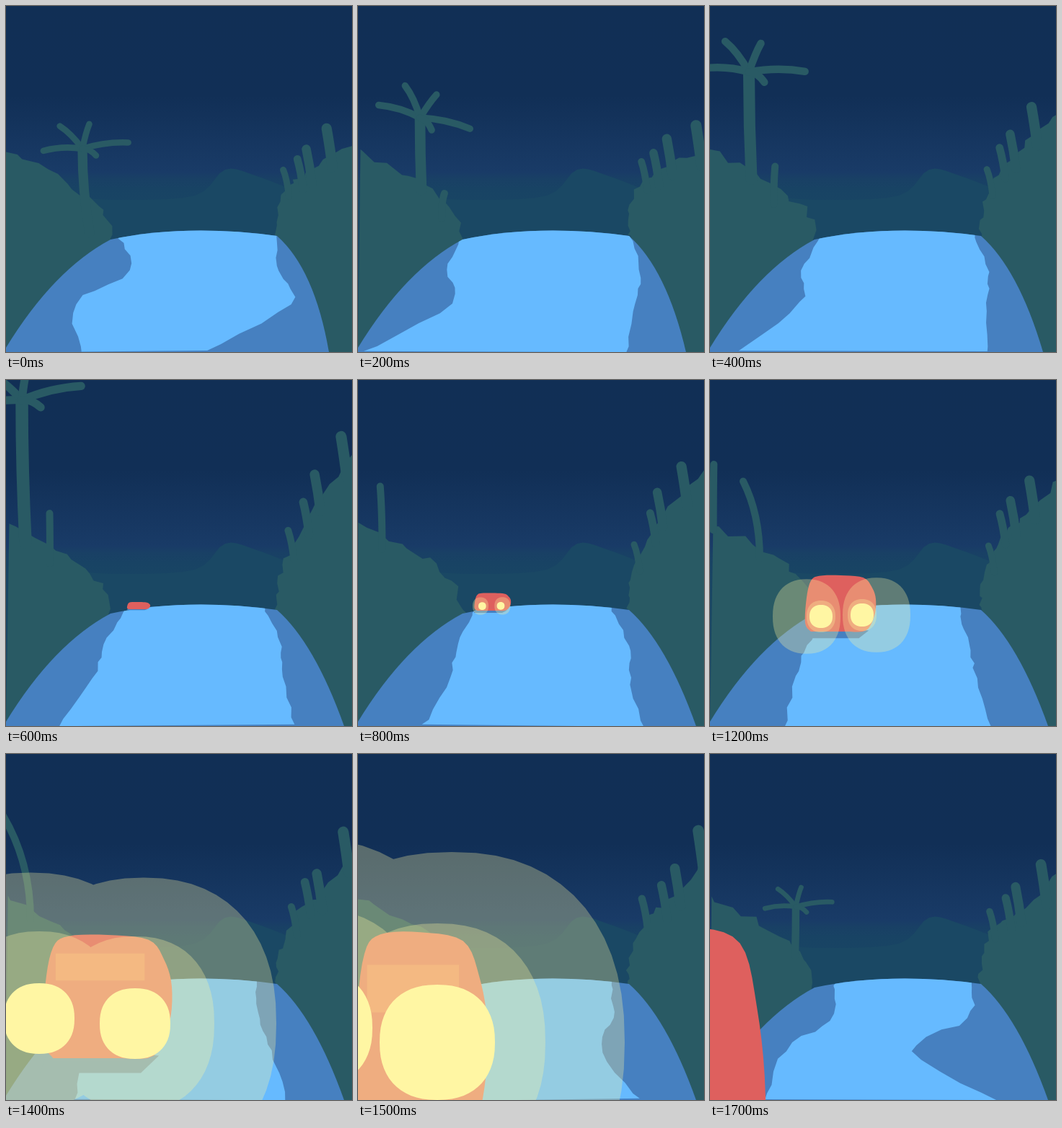
An HTML page with a canvas for the animation above (1800 ms loop, 480x480 px).

```html
<!DOCTYPE html>
<html lang="en">
<head>
<meta charset="utf-8">
<title>Night road</title>
<style>
html, body { margin: 0; width: 100%; height: 100%; overflow: hidden; background: #112f55; }
canvas { display: block; width: 480px; height: 480px; }
</style>
</head>
<body>
<canvas id="stage" width="480" height="480"></canvas>
<script>
const ctx = document.getElementById('stage').getContext('2d');
const STEP = 100, STEPS = 18;
const GREEN = '#295a64', RED = '#de605e', VERGE = '#4680c0', ROAD = '#66baff';
const LAMP = '#fff6a3', GLOW = 'rgba(255,246,160,.3)';

// Values that change linearly between key steps; null outside their range
const track = keys => step => {
  const next = keys.findIndex(key => key[0] >= step);
  if (next < 0 || step < keys[0][0]) return null;
  const b = keys[next], a = keys[Math.max(next - 1, 0)];
  const u = a === b ? 0 : (step - a[0]) / (b[0] - a[0]);
  return a.slice(1).map((value, i) => value + (b[i + 1] - value) * u);
};

const noise = n => {
  const v = Math.sin(n * 12.9898) * 43758.5453;
  return v - Math.floor(v) - .5;
};
const ragged = (points, size, seed) =>
  points.map(([x, y], i) => [x + size * noise(seed + i), y + size * noise(seed + i + 500)]);

// Catmull-Rom curve through a few points
function curve(points, parts = 5) {
  const at = i => points[Math.min(Math.max(i, 0), points.length - 1)];
  const result = [];
  for (let i = 0; i < points.length - 1; i++) {
    for (let n = 0; n < parts; n++) {
      const t = n / parts;
      result.push([0, 1].map(k => {
        const [a, b, c, d] = [-1, 0, 1, 2].map(j => at(i + j)[k]);
        return b + t / 2 * (c - a + t * (2 * a - 5 * b + 4 * c - d + t * (3 * (b - c) + d - a)));
      }));
    }
  }
  return [...result, at(points.length - 1)];
}

function fill(points, color) {
  ctx.fillStyle = color;
  ctx.beginPath();
  points.forEach(([x, y]) => ctx.lineTo(x, y));
  ctx.fill();
}

function blade(x0, y0, cx, cy, x1, y1, width) {
  ctx.strokeStyle = GREEN;
  ctx.lineCap = 'round';
  ctx.lineWidth = width;
  ctx.beginPath();
  ctx.moveTo(x0, y0);
  ctx.quadraticCurveTo(cx, cy, x1, y1);
  ctx.stroke();
}

// Slightly squared ellipses filled as one shape
function blobs(centres, rx, ry, color) {
  const bend = v => Math.sign(v) * Math.abs(v) ** (2 / 2.3);
  ctx.fillStyle = color;
  ctx.beginPath();
  for (const [x, y] of centres) {
    for (let i = 0; i <= 60; i++) {
      const angle = i * Math.PI / 30;
      const point = [x + rx * bend(Math.cos(angle)), y + ry * bend(Math.sin(angle))];
      i ? ctx.lineTo(...point) : ctx.moveTo(...point);
    }
  }
  ctx.fill();
}

// Lit road: left then right edge at four heights
const ROWS = [322, 368, 412, 480];
const roadEdges = track([
  [0, 158, 172, 95, 105, 376, 378, 394, 280],
  [2, 142, 122, 130, 10, 378, 391, 386, 372],
  [6, 165, 135, 122, 72, 360, 382, 384, 399],
  [10, 156, 140, 132, 110, 344, 368, 370, 390],
  [14, 155, 130, 105, 98, 348, 350, 368, 388],
  [17, 172, 166, 104, 76, 362, 358, 280, 396]
]);
// Height of the right bank at x = 480, 440 and 410
const rightHeights = track([
  [0, 190, 215, 236], [2, 200, 215, 235], [6, 100, 160, 205],
  [10, 142, 180, 207], [14, 130, 192, 212], [17, 164, 211, 230]
]);
// Tip and root of the tall grass passing on the left
const grasses = [
  track([[2, 120, 260, 116, 295], [10, 1, 110, 6, 215]]),
  track([[10, 22, 167, 14, 225], [13, -3, 92, 0, 200]]),
  track([[10, 97, 197, 104, 265], [14, -5, 84, 34, 230]])
];
// Crown, foot, size and turn; counted from the step before the loop restarts
const palmPose = track([
  [0, 119, 212, 118, 280, .75, 0], [1, 106, 198, 116, 315, .95, 0],
  [3, 86, 155, 88, 255, 1.05, .35], [7, 22, 28, 27, 225, 1.25, -.1], [9, -40, -70, -30, 220, 1.5, -.1]
]);
const FRONDS = [[-57, 3], [-33, -33], [10, -36], [67, -9], [20, 10]];

// Left, top, right and bottom of the car
const carBox = track([
  [6, 168, 308, 200, 318], [10, 155, 283, 224, 322], [12, 132, 271, 230, 349],
  [14, 51, 251, 230, 422], [17, -120, 240, 77, 800]
]);
const CAR = [[.08, 1], [0, .85], [.02, .4], [.08, .1], [.2, .01], [.5, 0], [.82, .04],
  [.94, .2], [1, .42], [.98, .72], [.86, .98], [.6, 1]];
// Left lamp, right lamp, lamp radius, inner and outer glow radius, spread of the glow
const lampPose = track([
  [7, 175, 314, 193, 314, 2, 3, 5, 1], [10, 167, 313, 208, 312, 12, 12, 23, 5],
  [12, 154, 328, 211, 326, 16, 20, 47, 20], [14, 46, 367, 179, 374, 49, 110, 184, 12],
  [15, -60, 380, 110, 400, 80, 150, 240, 20]
]);

const sky = ctx.createLinearGradient(0, 0, 0, 480);
[[0, '#112f55'], [.26, '#112f56'], [.48, '#193b67'], [.5, '#194065'], [.53, '#184364'], [.6, '#194664']]
  .forEach(stop => sky.addColorStop(...stop));
const hills = curve([[90, 265], [160, 269], [262, 263], [304, 227], [345, 235], [400, 256]]);

function drawBanks(step) {
  const left = curve([[0, 200], [60, 229], [105, 258], [138, 290], [146, 332]], 4);
  fill([...ragged(left, 11, step * 31), [0, 480]], GREEN);
  for (const grass of grasses) {
    const pose = grass(step);
    if (!pose) continue;
    const [x, y, rootX, rootY] = pose;
    blade(rootX, rootY, rootX, (y + rootY) / 2 - 8, x, y, 10);
  }

  const [edge, middle, inner] = rightHeights(step);
  const right = ragged(curve([[484, edge], [440, middle], [410, inner], [388, 250], [376, 290], [375, 322]]), 7, step * 47);
  fill([...right, [380, 480], [490, 480]], GREEN);
  for (let i = 0; i < 4; i++) {
    const p = (i + step / 4 % 1) / 4;
    const [x, y] = right[Math.round(15 * (1 - p))];
    blade(x + 5, y + 15, x + 2, y - 10, x - 3, y - 22 - 22 * p, 9 + 7 * p);
  }
}

function drawPalm(step) {
  const pose = palmPose((step + 1) % STEPS);
  if (!pose) return;
  const [x, y, footX, footY, size, turn] = pose;
  blade(footX, footY, x, (y + footY) / 2, x, y, 14 * size);
  ctx.save();
  ctx.translate(x, y);
  ctx.rotate(turn);
  ctx.scale(size, size);
  FRONDS.forEach(([tipX, tipY]) => blade(0, 0, tipX / 2, tipY / 2 - 6, tipX, tipY, 9));
  ctx.restore();
}

function drawRoad(step) {
  const verge = new Path2D('M0 480V474Q66 366 145 324Q250 302 376 319Q428 365 '
    + (448 + 3.5 * Math.min(step, 6)) + ' 480Z');
  ctx.fillStyle = VERGE;
  ctx.fill(verge);

  const edges = roadEdges(step);
  const side = offset => ragged(curve(ROWS.map((y, i) => [edges[offset + i], y])), 5, step * 17 + offset);
  ctx.save();
  ctx.clip(verge);
  fill([[edges[0] + 15, 300], ...side(0), ...side(4).reverse(), [edges[4], 300]], ROAD);
  ctx.restore();
}

function drawCar(step) {
  const box = carBox(step);
  if (!box) return;
  const [left, top, right, bottom] = box;
  const place = ([u, v]) => [left + u * (right - left), top + v * (bottom - top)];
  fill([[.05, .9], [-.02, 1.12], [.76, 1.12], [.9, .98]].map(place), VERGE);
  fill(curve(CAR.map(place)), RED);

  const lamps = lampPose(step);
  if (!lamps) return;
  const [x0, y0, x1, y1, radius, inner, outer, spread] = lamps;
  const glowCentres = [[x0 - spread, y0], [x1 + spread, y1]];
  blobs(glowCentres, outer, outer * 1.1, GLOW);
  blobs(step < 12 ? [] : [[x0, y0], [x1, y1]], inner, inner * 1.1, GLOW);
  if (step > 12) {
    fill([[.1, .15], [.79, .15], [.79, .37], [.1, .37]].map(place), 'rgba(255,215,135,.28)');
  }
  blobs([[x0, y0], [x1, y1]], radius, radius, LAMP);
}

function draw(step) {
  ctx.fillStyle = sky;
  ctx.fillRect(0, 0, 480, 480);
  fill([...hills, [400, 335], [90, 335]], '#1a4864');
  drawBanks(step);
  drawPalm(step);
  drawRoad(step);
  drawCar(step);
}

const begin = performance.now();
function tick() {
  draw(Math.floor((performance.now() - begin) / STEP) % STEPS);
  requestAnimationFrame(tick);
}
tick();
</script>
</body>
</html>
```
